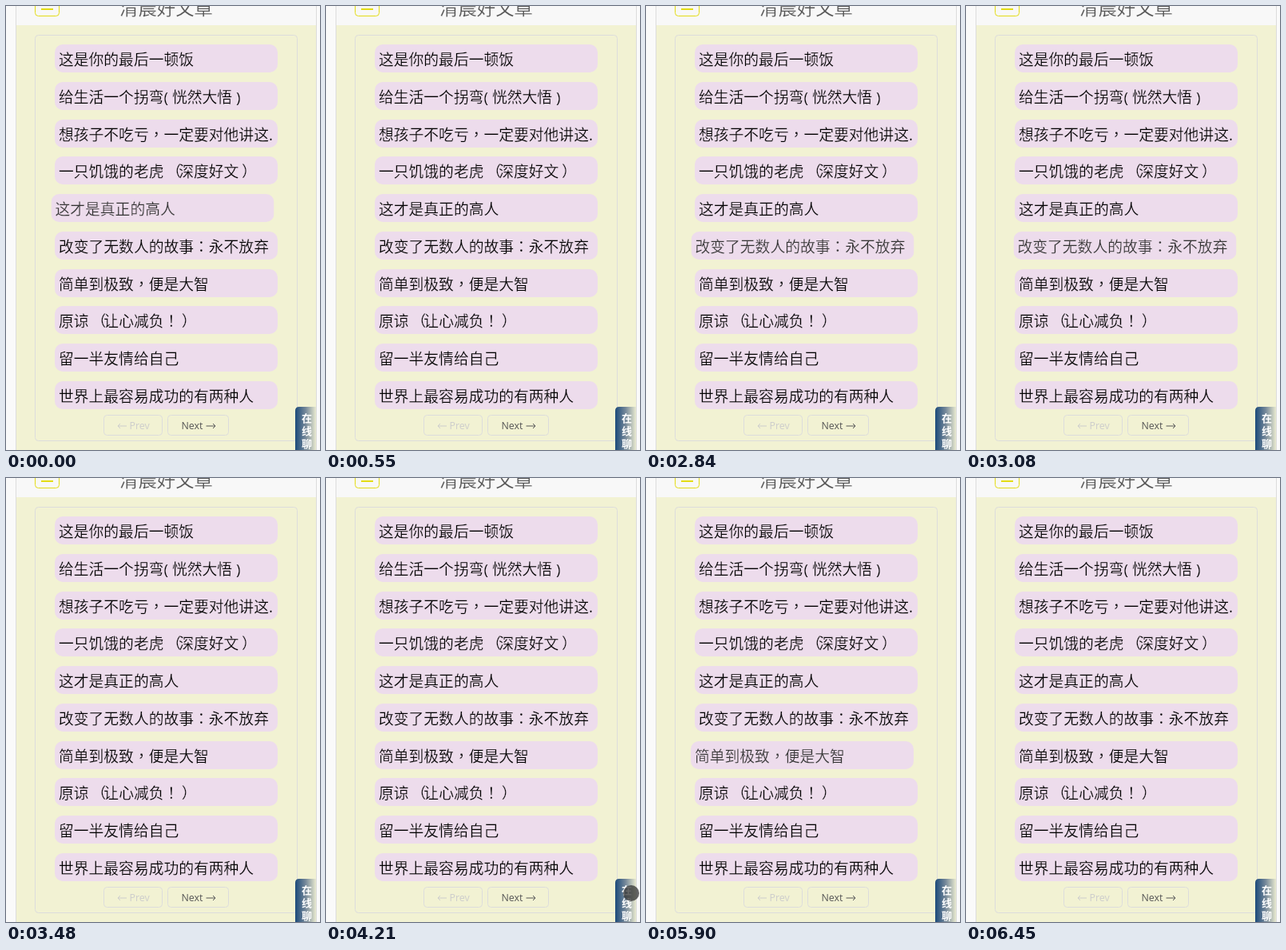
An HTML page for the animation above (7 s loop, 393 by 555 pixels).

```html
<!DOCTYPE html>
<html lang="zh-CN">
<head>
<meta charset="utf-8">
<style>
  html, body { margin: 0; width: 100%; height: 100%; overflow: hidden; background: #fafafa; }
  svg { display: block; width: 393px; height: 555px; }
  text { font-family: "Open Sans", "Noto Sans CJK SC", sans-serif; }
  .row { fill: #000; font-size: 18.8px; }
  .row rect { fill: #eddcec; }
  .row text { stroke: #eddcec; stroke-width: .25px; }
  .mid { font-family: "Noto Sans CJK TC", sans-serif; }
  .title { font-size: 23.4px; fill: #555; stroke: #f8f8f8; stroke-width: .25px; }
  .btn { font-size: 12.4px; font-weight: 500; }
  .tab { font-size: 13px; font-weight: 700; fill: #fff; text-anchor: middle; }
  .line { fill: none; stroke: #dcdcdc; }
  #touch { opacity: 0; }
</style>
</head>
<body>
<svg viewBox="0 0 393 555">
  <defs>
    <linearGradient id="fade">
      <stop offset="0" stop-color="#1b4a7a"/>
      <stop offset=".5" stop-color="#76899a"/>
      <stop offset="1" stop-color="#e9ead0"/>
    </linearGradient>
  </defs>
  <rect x="12" width="377" height="24" fill="#f8f8f8"/>
  <rect x="12" y="24" width="377" height="531" fill="#f2f2d3"/>
  <path class="line" d="M12.5 0V555M388.5 0V555"/>
  <rect x="36.5" y="-18.5" width="30" height="31" rx="4" fill="none" stroke="#e3dc14"/>
  <path d="M44 4H59" stroke="#e3dc14" stroke-width="2"/>
  <text class="title" x="142" y="11">清晨好文章</text>
  <rect class="line" x="36.5" y="36.5" width="328" height="507" rx="4"/>
  <g id="list"></g>
  <g class="btn">
    <rect class="line" x="122.5" y="511.5" width="73" height="25" rx="4"/>
    <path d="M151 525H140M143 522L140 525L143 528" fill="none" stroke="#ccc"/>
    <text x="154.5" y="529" fill="#ccc">Prev</text>
    <rect class="line" x="202.5" y="511.5" width="76" height="25" rx="4"/>
    <text x="219.5" y="529" fill="#555">Next</text>
    <path d="M250.5 525H262M259 522L262 525L259 528" fill="none" stroke="#555"/>
  </g>
  <path d="M362 555V506Q362 501 367 501H388V555Z" fill="url(#fade)"/>
  <g class="tab">
    <text x="376.5" y="520">在</text>
    <text x="376.5" y="536">线</text>
    <text x="376.5" y="552">聊</text>
  </g>
  <circle id="touch" r="10" fill="#333"/>
</svg>
<script>
const LOOP = 7000, NS = 'http://www.w3.org/2000/svg';
const titles = [
  '这是你的最后一顿饭',
  '给生活一个拐弯( 恍然大悟 )',
  '想孩子不吃亏，一定要对他讲这.',
  '一只饥饿的老虎（深度好文）',
  '这才是真正的高人',
  '改变了无数人的故事：永不放弃',
  '简单到极致，便是大智',
  '原谅（让心减负！）',
  '留一半友情给自己',
  '世界上最容易成功的有两种人'
];

// Centre full-width punctuation in its cell.
const centre = s => s
  .replace(/[，：！]/g, '<tspan class="mid" lang="zh-Hant">$&</tspan>')
  .replace(/（(.)/g, '<tspan dx="3">（</tspan><tspan dx="-3">$1</tspan>')
  .replace(/）/g, '<tspan dx="3.5">）</tspan>');

const rows = titles.map((title, i) => {
  const g = document.createElementNS(NS, 'g');
  const y = Math.round(48 + i * 46.75);
  g.setAttribute('class', 'row');
  g.innerHTML = `<rect x="61" y="${y}" width="279" height="35" rx="10"/>` +
    `<text x="66" y="${y + 25.5}" xml:space="preserve">${centre(title)}</text>`;
  document.getElementById('list').append(g);
  return g;
});

// Each step holds until the next one.
function play(el, steps, pose) {
  const frames = steps.map(s => ({ offset: s[0] / LOOP, easing: 'step-end', ...pose(s) }));
  frames.push({ ...frames[frames.length - 1], offset: 1 });
  el.animate(frames, { duration: LOOP, iterations: Infinity });
}

// time, shift, text colour
const hover = {
  4: [[0, -4.5, '#333'], [150, -1, '#2a2a2a'], [300, 0, '#111'], [550, 0, '#000']],
  5: [[0, 0, '#000'], [2440, 0, '#333'], [2690, -7, '#333'], [2840, -4.5, '#333'],
      [2960, -3, '#333'], [3080, -1.5, '#333'], [3230, 0, '#222'], [3480, 0, '#000']],
  6: [[0, 0, '#000'], [5480, 0, '#333'], [5630, -6, '#333'], [5750, -10, '#333'],
      [5900, -5, '#333'], [6020, -1.5, '#333'], [6170, 0, '#222'], [6450, 0, '#000']]
};
for (const i in hover) {
  play(rows[i], hover[i], ([, dx, fill]) => ({ transform: `translateX(${dx}px)`, fill }));
}

// time, x, y, opacity
play(document.getElementById('touch'),
  [[0, 385, 516, 0], [3910, 385, 516, .75], [4060, 381, 518, .75], [4210, 382, 519, .75], [5630, 382, 519, 0]],
  ([, x, y, opacity]) => ({ transform: `translate(${x}px, ${y}px)`, opacity }));
</script>
</body>
</html>
```
